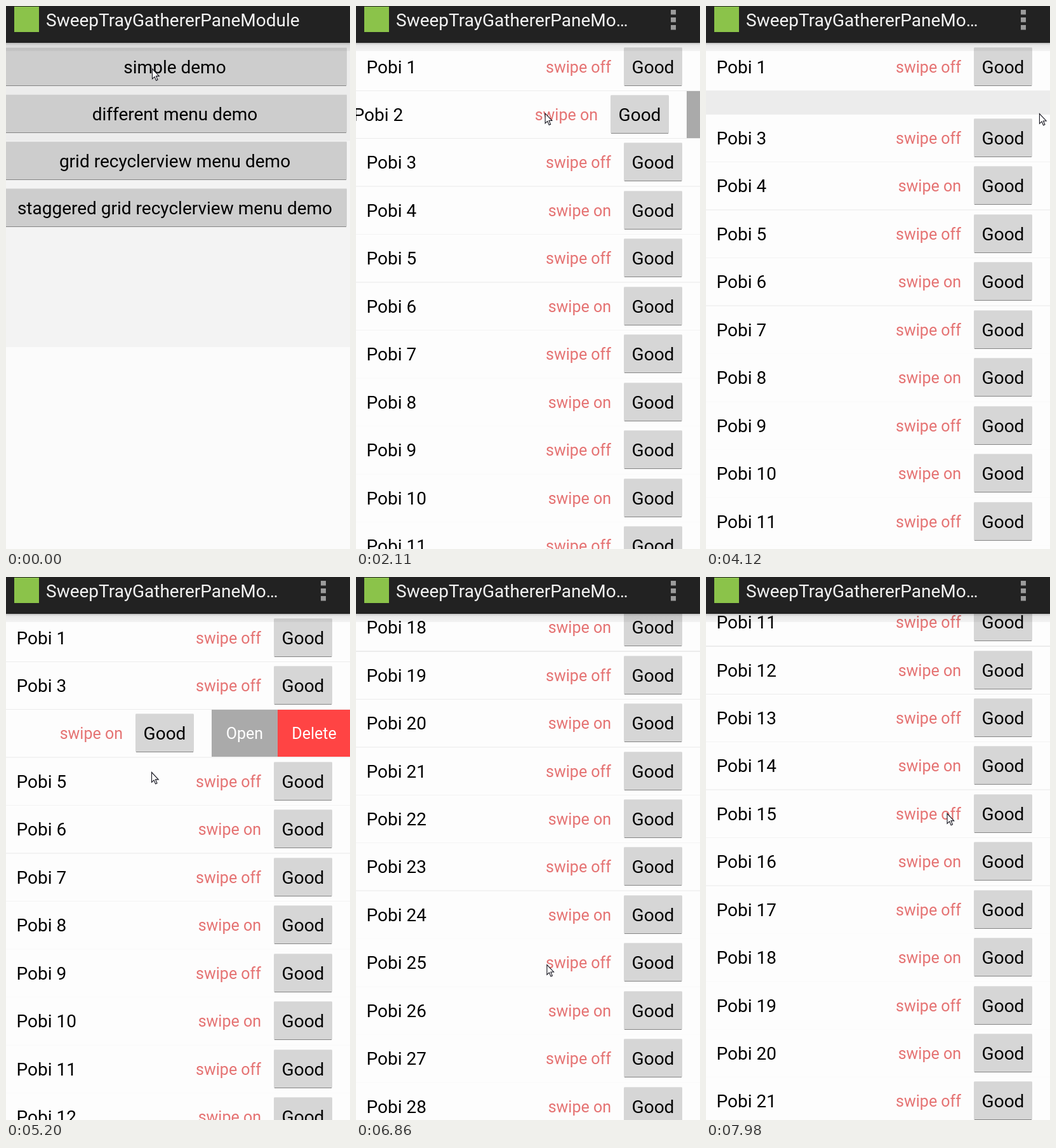
An HTML page for the animation above (8000 ms loop, 542 by 855 pixels).

```html
<!DOCTYPE html>
<html lang="en">
<head>
<meta charset="utf-8">
<title>Swipe list demo</title>
<style>
  html, body { margin: 0; width: 100%; height: 100%; overflow: hidden; background: #fbfbfb; }
  svg { display: block; width: 542px; height: 855px; font: 28px Roboto, sans-serif; }
</style>
</head>
<body>
<svg viewBox="0 0 542 855" xmlns="http://www.w3.org/2000/svg">
  <defs>
    <linearGradient id="shade" x2="0" y2="1">
      <stop offset="0" stop-color="#000" stop-opacity=".22"/>
      <stop offset=".3" stop-color="#000" stop-opacity=".08"/>
      <stop offset="1" stop-color="#000" stop-opacity=".04"/>
    </linearGradient>
  </defs>
  <g id="home"></g>
  <g id="list"></g>
  <path id="cursor" d="M.5 .5V16.2L4.1 12.9L6.6 18.8L9 17.8L6.5 11.9H11.2Z" fill="#fff" stroke="#15151f" stroke-width="1.1"/>
</svg>
<script>
const NS = 'http://www.w3.org/2000/svg';
const LOOP = 8000, PITCH = 75.44, TOP = 58.6, ROW_H = 74, MENU_W = 218, COUNT = 30;
const home = document.getElementById('home');
const list = document.getElementById('list');
const cursor = document.getElementById('cursor');

function add(parent, tag, attrs, content) {
  const node = document.createElementNS(NS, tag);
  for (const key in attrs) node.setAttribute(key, attrs[key]);
  if (content) node.textContent = content;
  parent.appendChild(node);
  return node;
}
const box = (parent, x, y, width, height, fill, rx = 0) =>
  add(parent, 'rect', { x, y, width, height, fill, rx });
const label = (parent, x, y, content, fill = '#000', size = 28, anchor = 'start') =>
  add(parent, 'text', { x, y, fill, 'font-size': size, 'text-anchor': anchor }, content);

function button(parent, x, y, width, content, fill) {
  box(parent, x, y, width, 61, fill, 2);
  box(parent, x + 1, y, width - 2, 1, '#e2e2e2');
  box(parent, x + 1, y + 60, width - 2, 1, '#858585');
  label(parent, x + width / 2, y + 41, content, '#000', 28, 'middle');
}

function backdrop(parent) {
  box(parent, 0, 0, 542, 212, '#ececec');
  box(parent, 0, 212, 542, 325, '#f3f3f3');
  box(parent, 0, 537, 542, 318, '#fbfbfb');
}

function header(parent, title) {
  box(parent, 0, 58, 542, 13, 'url(#shade)');
  box(parent, 0, 0, 542, 58, '#222');
  box(parent, 13, 1, 39, 40, '#8bc34a');
  label(parent, 63, 32, title, '#f3f3f3');
}

function buildHome() {
  backdrop(home);
  ['simple demo', 'different menu demo', 'grid recyclerview menu demo',
   'staggered grid recyclerview menu demo'].forEach((name, i) =>
    button(home, -5, 65 + 74 * i, 542, name, '#cdcdcd'));
  header(home, 'SweepTrayGathererPaneModule');
}

function buildRow(n) {
  const row = add(list, 'g', {});
  const slide = add(row, 'g', {});
  box(slide, 0, 0, 542, ROW_H, '#fdfdfd');
  label(slide, 16.5, 47, 'Pobi ' + n);
  label(slide, 402, 46, n % 2 ? 'swipe off' : 'swipe on', '#e57373', 25, 'end');
  button(slide, 422, 6, 92, 'Good', '#d6d6d6');
  if (n % 2 === 0) {
    box(slide, 542, 0, 104, ROW_H, '#aaa');
    box(slide, 646, 0, 114, ROW_H, '#f44');
    label(slide, 594, 46, 'Open', '#fff', 25, 'middle');
    label(slide, 703.5, 46, 'Delete', '#fff', 25, 'middle');
  }
  return { n, row, slide };
}

function buildList() {
  backdrop(list);
  const rows = Array.from({ length: COUNT }, (_, i) => buildRow(i + 1));
  header(list, 'SweepTrayGathererPaneMo…');
  for (let i = 0; i < 3; i++) box(list, 496, 6 + 12 * i, 8, 7.5, '#9b9b9b');
  return rows;
}

// Stretches of activity: first and last refresh, number of refreshes
const BURSTS = [[0, 0, 1], [500, 650, 2], [1200, 1710, 5], [2110, 3150, 9], [3270, 3540, 3],
  [3820, 4810, 8], [4940, 5870, 8], [6020, 6990, 8], [7140, 7980, 7]];

// Moment of the latest screen refresh
function snap(time) {
  const [first, last, count] = BURSTS.filter(burst => burst[0] <= time).pop();
  if (count === 1) return first;
  const step = (last - first) / (count - 1);
  return first + step * Math.min(count - 1, Math.floor((time - first + 10) / step));
}

const inOut = power => p => p < .5 ? (2 * p) ** power / 2 : 1 - (2 - 2 * p) ** power / 2;
const linear = inOut(1), soft = inOut(1.5), cubic = inOut(3), quartic = inOut(4);
const ramp = (t, from, to, ease = linear) =>
  ease(Math.min(1, Math.max(0, (t - from) / (to - from))));

// Pointer stops: time, x, y
const STOPS = [[1070, 230, 98.5], [1710, 373, 165], [2500, 225, 172], [2890, 426.5, 180],
  [3150, 466, 170], [3540, 525, 169], [4100, 525, 169], [5205, 229, 307], [5600, 300, 430],
  [6297, 330.5, 265], [6990, 296, 660], [7280, 292.5, 707], [7980, 379.5, 372]];

function pointer(t) {
  let [, x, y] = STOPS[0];
  for (let i = 1; i < STOPS.length; i++) {
    const [from, x0, y0] = STOPS[i - 1], [to, x1, y1] = STOPS[i];
    const p = ramp(t, from, to, soft);
    x += (x1 - x0) * p;
    y += (y1 - y0) * p;
  }
  return [x, y];
}

const scrollAt = t => 1227.5 * ramp(t, 6020, 6990, quartic) - 524 * ramp(t, 7020, 7980, cubic);

// Share of a row's menu pulled into view
function pullAt(n, t) {
  if (n === 2) return ramp(t, 1980, 2760, soft);
  if (n === 4) return ramp(t, 4660, 5200, soft) - ramp(t, 5440, 5870, soft);
  return 0;
}

const move = (node, x, y) => node.setAttribute('transform', `translate(${x} ${y})`);

function draw(time) {
  const t = snap(time);
  list.style.display = t < 500 ? 'none' : '';
  list.setAttribute('opacity', t < 650 ? .6 : 1);

  const scroll = scrollAt(t);
  const fade = 1 - ramp(t, 3680, 3960);
  const closed = ramp(t, 3960, 4240);
  for (const { n, row, slide } of rows) {
    const index = n - 1 - (n > 2 ? closed : 0);
    move(row, 0, Math.round(TOP + PITCH * index - scroll));
    move(slide, -Math.round(MENU_W * pullAt(n, t)), 0);
    if (n === 2) row.setAttribute('opacity', fade);
  }
  move(cursor, ...pointer(t));
}

buildHome();
const rows = buildList();
const start = performance.now();
function loop() {
  draw((performance.now() - start) % LOOP);
  requestAnimationFrame(loop);
}
loop();
</script>
</body>
</html>
```
